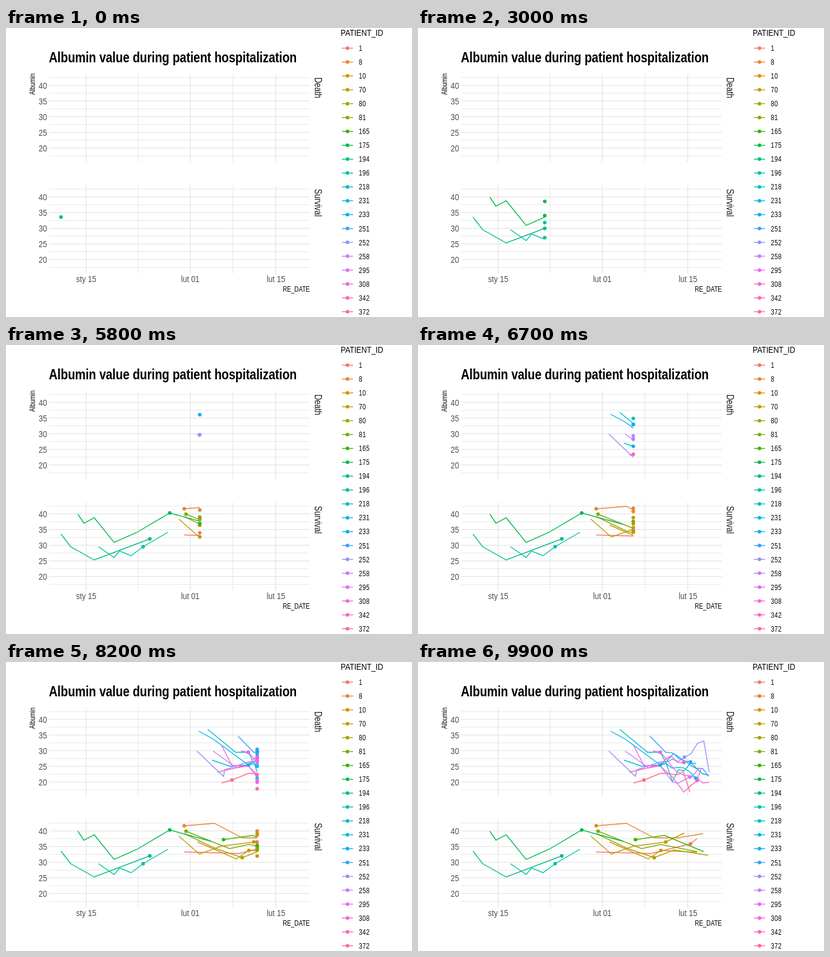
An HTML page that plays this animation: 672 by 480 pixels, repeating every 10000 ms.

```html
<!DOCTYPE html>
<html lang="en">
<head>
<meta charset="utf-8">
<title>Albumin value during patient hospitalization</title>
<style>
html, body { margin: 0; width: 100%; height: 100%; overflow: hidden; background: #fff; }
svg { display: block; width: 672px; height: 480px; }
text { font-family: "Liberation Sans", Arial, sans-serif; }
polyline { fill: none; stroke-width: 1.4; }
.major { stroke: #dedede; stroke-width: 1; }
.minor { stroke: #e5e5e5; stroke-width: .9; }
</style>
</head>
<body>
<svg id="stage" viewBox="0 0 672 480"></svg>
<script>
const stage = document.getElementById('stage');
const DAY = 10.1;

function add(tag, attrs, parent = stage) {
  const el = document.createElementNS('http://www.w3.org/2000/svg', tag);
  for (const key in attrs) el.setAttribute(key, attrs[key]);
  return parent.appendChild(el);
}

// Every label shares one narrow sans style.
function label(str, x, y, size, { anchor = 'start', turn = 0, fill = '#000', weight = 400, gap = 0 } = {}) {
  add('text', {
    transform: `translate(${x} ${y}) rotate(${turn}) scale(.82 1)`,
    'font-size': size, 'text-anchor': anchor, 'font-weight': weight, 'letter-spacing': gap, fill
  }).textContent = str;
}

const rule = (cls, x1, y1, x2, y2) => add('line', { class: cls, x1, y1, x2, y2 });
const dot = (cx, cy, fill, parent) => add('circle', { cx, cy, r: 3, fill }, parent);

// Evenly spaced hues in polar LUV, luminance 65 and chroma 100.
function hue(i) {
  const angle = (15 + 18 * i) * Math.PI / 180;
  const u = 100 * Math.cos(angle) / 845 + 0.19784;
  const v = 100 * Math.sin(angle) / 845 + 0.46834;
  const Y = (81 / 116) ** 3;
  const X = 9 * u * Y / (4 * v);
  const Z = 3 * Y / v - 5 * Y - X / 3;
  const rgb = [
    3.2406 * X - 1.5372 * Y - 0.4986 * Z,
    -0.9689 * X + 1.8758 * Y + 0.0415 * Z,
    0.0557 * X - 0.204 * Y + 1.057 * Z
  ].map(c => {
    const s = c > 0.0031308 ? 1.055 * c ** (1 / 2.4) - 0.055 : 12.92 * c;
    return Math.round(255 * Math.min(1, Math.max(0, s)));
  });
  return `rgb(${rgb})`;
}

function panel(top, name) {
  const first = top + 18.8;
  for (let i = -1; i < 10; i++) {
    const y = first + i * 13;
    rule(i % 2 ? 'minor' : 'major', 71.5, y, 502.8, y);
  }
  for (const x of [218.8, 375.6]) rule('minor', x, top, x, top + 146.5);
  for (const x of [132.7, 305, 446.5]) rule('major', x, top, x, top + 146.5);
  for (let i = 0; i < 5; i++) {
    label(40 - i * 5, 68, first + i * 26 + 5.4, 15.33, { anchor: 'end', fill: '#4d4d4d' });
  }
  label(name, 511, top + 5.5, 16, { turn: 90, fill: '#1a1a1a', gap: -0.1 });
}

panel(76.4, 'Death');
panel(261.8, 'Survival');
label('Albumin value during patient hospitalization', 71, 57, 24, { weight: 700, gap: -0.11 });
label('Albumin', 48, 75.5, 12, { anchor: 'end', turn: -90 });
label('RE_DATE', 502.8, 438, 12, { anchor: 'end' });
[['sty 15', 132.7], ['lut 01', 305], ['lut 15', 446.8]].forEach(([str, x]) =>
  label(str, x, 422, 15.33, { anchor: 'middle', fill: '#4d4d4d' }));
label('PATIENT_ID', 554, 13, 15.33, { gap: -0.06 });

const lineLayer = add('g', {});
const dotLayer = add('g', {});
const patients = [];

let seed = 7;
const random = () => (seed = seed * 16807 % 2147483647) / 2147483647;

// Late in a stay the readings come daily and scatter around the trend.
function addDaily(keys, scatter) {
  return keys.flatMap(([x, y], i) => {
    const [nx, ny] = keys[i + 1] || [x, y];
    const days = scatter && x > 400 ? Math.max(1, Math.round((nx - x) / DAY)) : 1;
    return Array.from({ length: days }, (_, d) => [
      x + (nx - x) * d / days,
      y + (ny - y) * d / days + (d && (random() - 0.5) * 2 * scatter)
    ]);
  });
}

// stay: reading whose dot remains; coords: x, y pairs of the key readings
function patient(scatter, id, stay, ...coords) {
  const i = patients.length;
  const color = hue(i);
  const y = 33.5 + i * 23.04;
  add('polyline', { points: `556,${y} 574.5,${y}`, stroke: color });
  dot(565.2, y, color);
  label(id, 584, y + 4.5, 12.27, { gap: 0.45 });

  const keys = [];
  for (let k = 0; k < coords.length; k += 2) keys.push(coords.slice(k, k + 2));
  const last = keys.length - 1;
  const tracks = stay === last ? [keys] : [[keys[0], keys[last]], keys.filter((_, k) => k % 2)];
  patients.push({
    pts: addDaily(keys, scatter),
    line: add('polyline', { stroke: color }, lineLayer),
    stayX: keys[stay][0],
    stayDot: dot(...keys[stay], color, dotLayer),
    movers: tracks.map(pts => ({ pts, el: dot(0, 0, color, dotLayer) }))
  });
}
const survived = (...args) => patient(0, ...args);
const died = (...args) => patient(6, ...args);

survived(1, 2, 295, 315.5, 386, 318, 451, 302, 462, 293);
survived(8, 0, 295, 272, 345, 268, 391, 292, 431, 292, 472, 285);
survived(10, 2, 317, 299, 381, 327, 402, 313, 462, 316);
survived(70, 3, 286, 289, 320, 319, 356, 306, 410, 299, 441, 284);
survived(80, 2, 295, 285, 345, 309, 391, 325, 424, 312, 480, 321);
survived(81, 0, 298, 281, 370, 310, 402, 303, 462, 315);
survived(165, 0, 360, 295, 408, 288, 473, 315);
survived(175, 5, 119, 281, 129, 296, 146, 287, 179, 328, 217, 311, 271, 279, 340, 298);
survived(194, 3, 91, 314, 107, 335, 146, 357, 238, 322);
survived(196, 4, 153, 335, 179, 353, 188, 342, 207, 350, 227, 335, 268, 311);
died(218, 2, 334, 112, 380, 150, 401, 150, 421, 199, 431, 179, 460, 168);
died(231, 4, 341, 163, 370, 173, 401, 171, 440, 176, 460, 193);
died(233, 2, 319, 115, 343, 128, 401, 171, 423, 152, 481, 188);
died(251, 2, 384, 123, 410, 150, 451, 166, 481, 190);
died(252, 4, 316, 148, 360, 190, 362, 179, 401, 166, 441, 158, 473, 131, 482, 183);
died(258, 4, 343, 148, 382, 176, 401, 172, 421, 199, 450, 191, 466, 176);
died(295, 1, 389, 148, 401, 150, 440, 188, 482, 200);
died(308, 4, 357, 139, 374, 172, 401, 173, 440, 216, 462, 197, 469, 176);
died(342, 3, 350, 183, 401, 171, 419, 156, 440, 167);
died(372, 1, 357, 201, 374, 196, 401, 185, 439, 182, 450, 216);

function yAt(pts, x) {
  const i = pts.findIndex(p => p[0] > x);
  const [x0, y0] = pts[i - 1], [x1, y1] = pts[i];
  return y0 + (y1 - y0) * (x - x0) / (x1 - x0);
}

const inside = (pts, x) => x >= pts[0][0] && x < pts[pts.length - 1][0];
const show = (el, on) => el.setAttribute('visibility', on ? 'visible' : 'hidden');

function draw(x) {
  for (const p of patients) {
    const seen = p.pts.filter(q => q[0] <= x);
    if (inside(p.pts, x)) seen.push([x, yAt(p.pts, x)]);
    p.line.setAttribute('points', seen.join(' '));
    show(p.stayDot, x >= p.stayX);
    for (const m of p.movers) {
      const on = inside(m.pts, x);
      show(m.el, on);
      if (on) {
        m.el.setAttribute('cx', x);
        m.el.setAttribute('cy', yAt(m.pts, x));
      }
    }
  }
}

// The reveal moves right in 100 equal steps of 100 ms.
const start = performance.now();
function tick() {
  const step = Math.floor((performance.now() - start) / 100) % 100;
  draw(91 + step * 3.96);
  requestAnimationFrame(tick);
}
tick();
</script>
</body>
</html>
```
